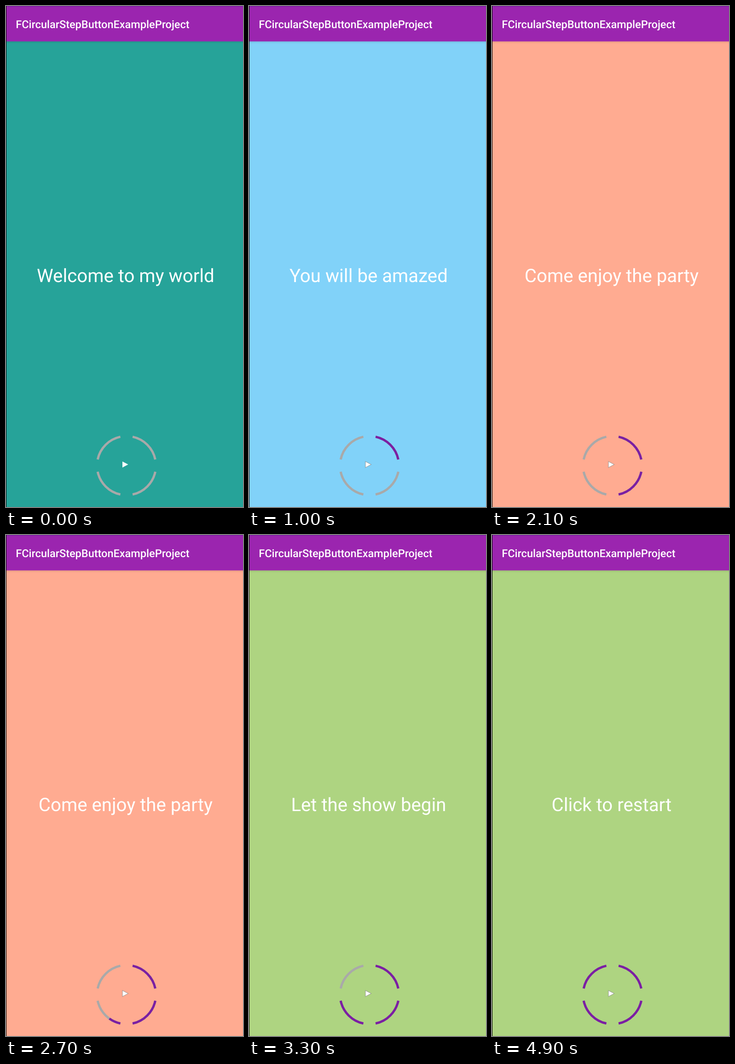
An HTML page that plays this animation: 515x1087 px, repeating every 5 s.

```html
<!DOCTYPE html>
<html lang="en">
<head>
<meta charset="utf-8">
<title>Circular step button</title>
<style>
  html, body { margin: 0; width: 100%; height: 100%; overflow: hidden; background: #26a399; }
  svg { display: block; width: 100%; height: 100%; }
  text { font-family: Roboto, sans-serif; fill: #fff; text-rendering: geometricPrecision; }
  #title { font-size: 23.5px; font-weight: 500; }
  #message { font-size: 40.2px; text-anchor: middle; }
  .arc { fill: none; stroke: #a9a9a9; stroke-width: 5; }
  .fill { stroke: #7b1fa2; }
</style>
</head>
<body>
<svg viewBox="0 0 515 1087" preserveAspectRatio="none">
  <defs>
    <linearGradient id="shade" x2="0" y2="1">
      <stop offset="0" stop-color="#000" stop-opacity=".1"/>
      <stop offset="1" stop-color="#000" stop-opacity="0"/>
    </linearGradient>
  </defs>
  <rect id="page" width="515" height="1087"/>
  <rect y="76.8" width="515" height="5" fill="url(#shade)"/>
  <rect width="515" height="76.8" fill="#9b25af"/>
  <rect width="515" height="1.5" fill="#7b1fa2"/>
  <rect width="1" height="1087" fill="#000"/>
  <text id="title" x="21.3" y="48.3">FCircularStepButtonExampleProject</text>
  <text id="message" x="259.9" y="599"></text>
  <g id="ring" transform="translate(261.8 997.2)"></g>
  <path id="play" d="M253 988.2 265.5 994.8 253 1001.4Z" fill="#fff" stroke-width="1.3"/>
</svg>
<script>
  const LOOP = 5000, TICK = 100, FILL_TIME = 870;
  const RADIUS = 64, GAP = 12;
  const starts = [0, 1180, 2390, 3590];
  const scenes = [
    { from: 0, color: '#26a399', text: 'Welcome to my world' },
    { from: 900, color: '#81d2f9', text: 'You will be amazed' },
    { from: 2100, color: '#ffab91', text: 'Come enjoy the party' },
    { from: 3300, color: '#aed481', text: 'Let the show begin' },
    { from: 4500, color: '#aed481', text: 'Click to restart' }
  ];
  const byId = id => document.getElementById(id);
  const page = byId('page'), message = byId('message'), play = byId('play'), ring = byId('ring');

  function point(degrees) {
    const a = degrees * Math.PI / 180;
    return `${RADIUS * Math.sin(a)} ${-RADIUS * Math.cos(a)}`;
  }

  function addArc(quarter, className) {
    const arc = document.createElementNS(ring.namespaceURI, 'path');
    const begin = quarter * 90 + GAP, end = quarter * 90 + 90 - GAP;
    arc.setAttribute('d', `M${point(begin)}A${RADIUS} ${RADIUS} 0 0 1 ${point(end)}`);
    arc.setAttribute('class', className);
    arc.setAttribute('pathLength', 1);
    return ring.appendChild(arc);
  }

  const fills = starts.map((_, i) => {
    addArc(i, 'arc');
    return addArc(i, 'arc fill');
  });

  function draw() {
    const time = Math.floor(performance.now() % LOOP / TICK) * TICK;
    const index = scenes.findLastIndex(scene => time >= scene.from);
    const scene = scenes[index];
    page.setAttribute('fill', scene.color);
    if (message.textContent !== scene.text) message.textContent = scene.text;
    play.setAttribute('stroke', index ? 'rgba(130,130,130,.6)' : 'none');
    fills.forEach((arc, i) => {
      const progress = Math.min(1, Math.max(0, (time - starts[i]) / FILL_TIME));
      arc.style.display = progress ? '' : 'none';
      arc.setAttribute('stroke-dasharray', progress < 1 ? `${progress} 2` : 'none');
    });
    requestAnimationFrame(draw);
  }
  draw();
</script>
</body>
</html>
```
